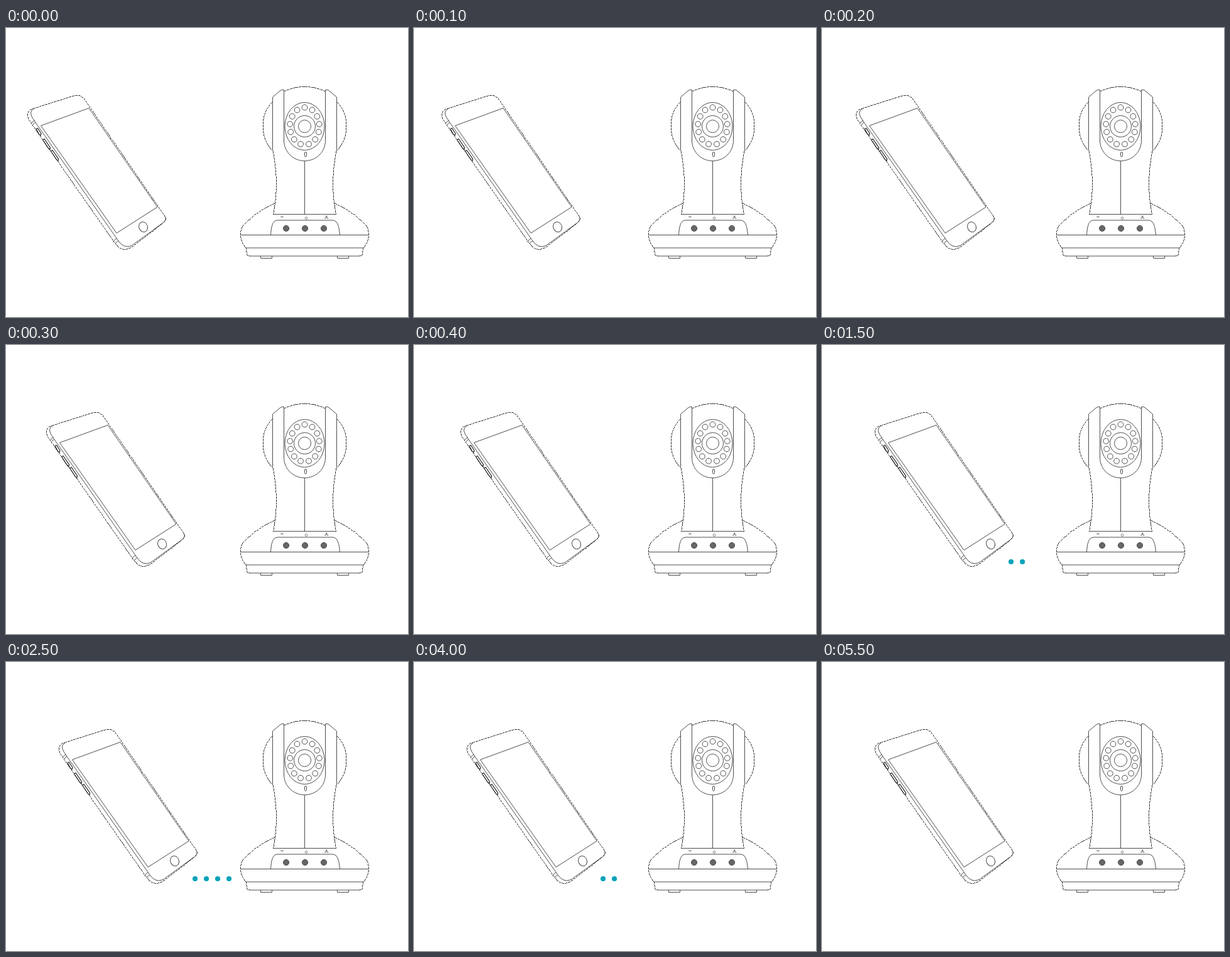
An HTML page for the animation above (7500 ms loop, 640 by 460 pixels).

```html
<!DOCTYPE html>
<html lang="en">
<head>
<meta charset="utf-8">
<title>Phone and camera</title>
<style>
  html, body { margin: 0; width: 100%; height: 100%; overflow: hidden; background: #fff; }
  svg { display: block; fill: none; stroke: #4c4c4c; stroke-width: 1; }
  .edge { stroke: #222; stroke-width: .9; stroke-dasharray: 4 1; shape-rendering: crispEdges; }
  .icon { stroke-width: .7; }
  #dots { fill: #0aa4ba; stroke: none; }
</style>
</head>
<body>
<svg width="640" height="460" viewBox="0 0 640 460">
  <g id="phone">
    <path class="edge" d="M43 128.5L106 108.5Q118 104.500 125 113.500L252.500 299Q257 305 250.500 310L202 347.500Q187 357.500 177 346.500L172 340.500L37 147Q31 135 39 130Q41 129 43 128.500"/>
    <path d="M44 128.500Q36.500 133 41.500 142L46 149L178 337.500Q187 352 200 346.500L250 310Q255 306 254 303M40 151.500L45.500 147M42 154.500L47 150M170.500 339.500L176 335M173.500 343L179 338.500"/>
    <path d="M55.500 155.500L132 127.500L241 285L176 326.500Z"/>
    <ellipse cx="218.500" cy="316.700" rx="6.800" ry="8.200" transform="rotate(-20 218.500 316.700)"/>
    <g stroke="#222" stroke-width="1.200">
      <path d="M48 160.500L50.500 159.500L56 168L55 171L52.500 169Z"/>
      <path d="M58.500 178L61 176.500L70.500 190.500L70 194L67.500 191.500Z"/>
      <path d="M71.500 196L74 194.500L83.500 208.500L83 211.500L80.500 209.500Z"/>
    </g>
  </g>

  <g id="camera">
    <g id="half">
      <path class="edge" d="M475.500 93.500Q458 93.500 443 101M424 118Q409 133 409 156T424 195M425 196C431 227 433 259 425.500 296.500M428 279Q412 286 399 296H397L377 315Q373.500 321 373.500 329.500Q374 341 382 350L384 361Q384 363 388 363"/>
      <path d="M424.500 196V110L437 99.500Q440 97.500 442.500 98.500V179C442.500 197 457 211.500 475.500 211.500"/>
    </g>
    <use href="#half" transform="matrix(-1 0 0 1 951 0)"/>
    <path d="M475.500 211.500V296.500M425.500 296.500H526M373.500 329.500H577.500M382 350H569M387 363H564"/>
    <path d="M405.500 363V366.500H423.500V363M527.500 363V366.500H545.500V363"/>
    <path d="M421.500 329.500C422 318 424 306 432 306H520C528 306 530.500 317 531.500 329.500"/>
    <ellipse cx="475.500" cy="156.500" rx="31.500" ry="38"/>
    <circle cx="475.500" cy="156.500" r="17"/>
    <circle cx="475.500" cy="156.500" r="10"/>
    <g id="lamps"></g>
    <rect x="475.500" y="197.500" width="3" height="7.500" rx="1.500"/>
    <g fill="#666">
      <circle cx="446" cy="319" r="4.600"/>
      <circle cx="476" cy="319" r="4.600"/>
      <circle cx="506" cy="319" r="4.600"/>
    </g>
    <g class="icon">
      <path d="M437 300.500Q439.500 298.500 442 300.500M438.300 301.700Q439.500 300.500 440.700 301.700M439.500 302.500V303"/>
      <path d="M476.700 301.200A1.900 1.900 0 1 0 479.300 301.200M478 300V302.200"/>
      <path d="M509.500 299H511V300.500H509.500ZM510.200 300.500V302H508V303.500M510.200 302H512.400V303.500M507.300 303H508.700M511.700 303H513.100"/>
    </g>
  </g>
  <g id="dots"></g>
</svg>
<script>
const LOOP = 7500, STEP = 100, BEAT = 500;
const phone = document.getElementById('phone');
const lamps = document.getElementById('lamps');
const dots = document.getElementById('dots');

function addCircle(parent, cx, cy, r) {
  const circle = document.createElementNS('http://www.w3.org/2000/svg', 'circle');
  Object.entries({ cx, cy, r }).forEach(([key, value]) => circle.setAttribute(key, value));
  parent.append(circle);
}

// Lamp positions relative to the camera axis; all but the top one are mirrored.
[[0, 126.5], [12, 130.5], [19.8, 140.7], [23.3, 153], [22.3, 165.5], [16.7, 177.3], [6.5, 184.7]]
  .forEach(([dx, y]) => {
    addCircle(lamps, 475.5 + dx, y, 4.4);
    if (dx) addCircle(lamps, 475.5 - dx, y, 4.4);
  });

for (let i = 0; i < 4; i++) addCircle(dots, 301 + 18 * i, 345, 4.1);

function draw(now) {
  const time = now % LOOP;
  const shift = 10 * Math.min(5, Math.floor(time / STEP));
  const beat = Math.floor(time / BEAT);
  const visible = beat < 11 ? Math.max(0, beat - 1) % 5 : 0;
  phone.setAttribute('transform', `translate(${shift} 0)`);
  [...dots.children].forEach((dot, i) => {
    dot.style.visibility = i < visible ? 'visible' : 'hidden';
  });
}

const start = performance.now();
function tick() {
  draw(performance.now() - start);
  requestAnimationFrame(tick);
}
tick();
</script>
</body>
</html>
```
